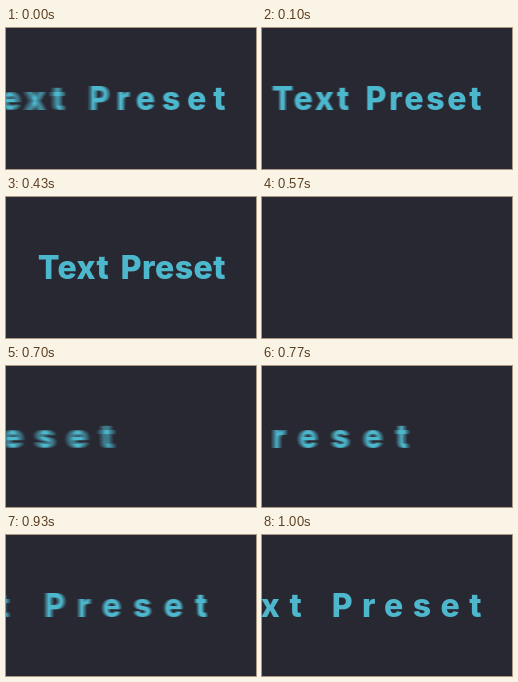
Recreate the animation shown at these times as an HTML page with a canvas. Size 250 by 141 pixels, loop 1.03 s.

```html
<!DOCTYPE html>
<html lang="en">
<head>
<meta charset="utf-8">
<title>Text Preset</title>
<style>
  html, body { margin: 0; width: 100%; height: 100%; overflow: hidden; background: #282832; }
  canvas { display: block; }
</style>
</head>
<body>
<canvas id="stage" width="250" height="141"></canvas>
<script>
const ctx = document.getElementById('stage').getContext('2d');
const LOOP = 1030, STEPS = 31, TEXT = 'Text Preset';
const RIGHT = 219.4, BASELINE = 82, SHUTTER = 0.4, SAMPLES = 12;

// Extra letter spacing: wide while sliding in, then closing up.
const tracking = s => 0.4 + (s < STEPS
  ? 13.4 - 7 * Math.exp((s - STEPS) / 2.1)
  : 6.4 * Math.exp((STEPS - s) * 0.343));

// Distance of the last letter from its resting place.
function slide(s) {
  const n = Math.max(0, 30 - s);
  return 9 * n + 114 * (n / 12) ** 4.5;
}

const width = text => ctx.measureText(text).width;

// Sets the letters from right to left, keeping the font's kerning.
function drawText(s) {
  let x = RIGHT - slide(s);
  const gap = tracking(s);
  for (let i = TEXT.length - 1; i >= 0; i--) {
    const next = TEXT.charAt(i + 1);
    x -= width(TEXT[i] + next) - width(next);
    ctx.fillText(TEXT[i], x, BASELINE);
    x -= gap;
  }
}

function draw(time) {
  const step = Math.floor((time % LOOP + 3.4) * 0.03) % STEPS;
  ctx.globalCompositeOperation = 'source-over';
  ctx.globalAlpha = 1;
  ctx.fillStyle = '#282832';
  ctx.fillRect(0, 0, 250, 141);
  if (step === 17 || step === 18) return;

  // Motion blur: add up the light of several moments; the last step is sharp.
  const s = step < 17 ? step + STEPS : step;
  const count = step === 30 ? 1 : SAMPLES;
  ctx.globalCompositeOperation = 'lighter';
  ctx.globalAlpha = 1 / count;
  ctx.fillStyle = 'rgb(38, 143, 155)';
  ctx.font = '800 32px Inter, sans-serif';
  ctx.wordSpacing = '4px';
  for (let i = 0; i < count; i++) {
    drawText(s + SHUTTER * ((i + 0.5) / count - 0.5));
  }
}

const start = performance.now();
function tick() {
  draw(performance.now() - start);
  requestAnimationFrame(tick);
}
tick();
</script>
</body>
</html>
```
